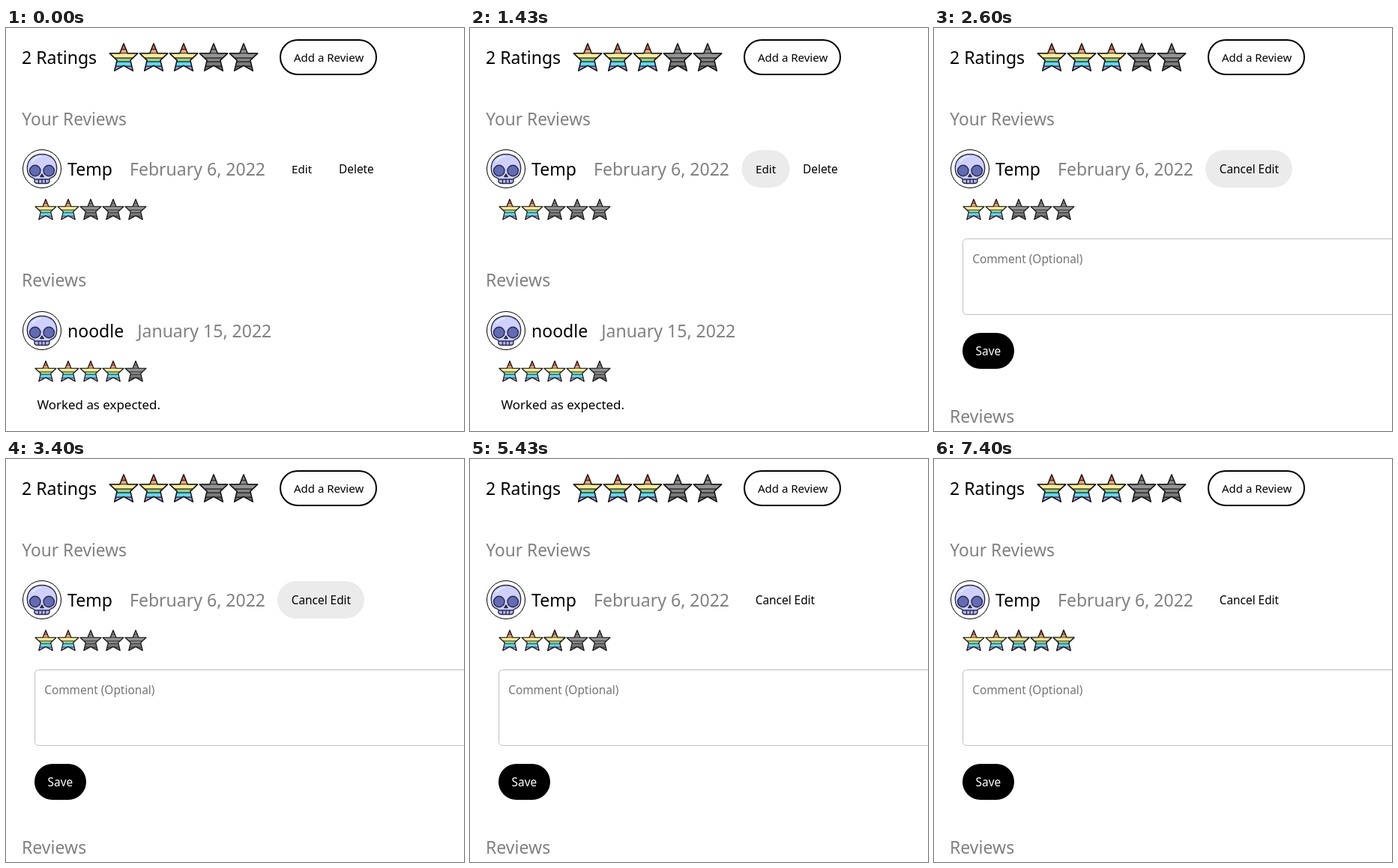
An HTML page that plays this animation: 611x538 px, repeating every 8000 ms.

```html
<!DOCTYPE html>
<html lang="en">
<head>
<meta charset="utf-8">
<title>Reviews</title>
<style>
html, body { margin: 0; width: 100%; height: 100%; overflow: hidden; background: #fff; }
svg { display: block; }
text { font-family: "Noto Sans", sans-serif; font-size: 15.4px; }
.big { font-size: 23.04px; }
.mute { fill: #808080; }

.lit { --a: #e8745c; --b: #f3a87c; --c: #fbeb9c; --d: #9bd08b; --e: #63d8f6; --f: #b39ae0; }
.dim { --a: #8c8c8c; --b: #8e8e8e; --c: #949494; --d: #868686; --e: #7a7a7a; --f: #6c6c6c; }

.view, .toggle { animation: 8s step-end infinite; }
.pill { fill: #ebebeb; animation: 8s cubic-bezier(.4, 0, .2, 1) infinite; }
#list { animation: shift 8s step-end infinite; }
#show { animation-name: show; }
#edit { animation-name: edit; }
#editPill { animation-name: editHover; }
#cancelPill { animation-name: cancelHover; }
.third { animation-name: third; }
.fourth { animation-name: fourth; }
.fifth { animation-name: fifth; }

@keyframes shift { 0% { transform: none } 30%, 100% { transform: translateY(182px) } }
@keyframes show { 0% { opacity: 1 } 30%, 100% { opacity: 0 } }
@keyframes edit { 0% { opacity: 0 } 30%, 100% { opacity: 1 } }
@keyframes editHover { 0%, 15% { opacity: 0 } 17.875%, 100% { opacity: 1 } }
@keyframes cancelHover { 0%, 29.75% { opacity: 0 } 32.5%, 42.25% { opacity: 1 } 45%, 100% { opacity: 0 } }
@keyframes third { 0% { opacity: 0 } 67.875%, 100% { opacity: 1 } }
@keyframes fourth { 0%, 87.125% { opacity: 0 } 72.875%, 91.625%, 100% { opacity: 1 } }
@keyframes fifth { 0%, 85% { opacity: 0 } 76.625%, 92.5%, 100% { opacity: 1 } }
</style>
</head>
<body>
<svg width="611" height="538" viewBox="0 0 611 538">
  <defs>
    <path id="starShape" d="M20 1.3 L25.2 14.3 H38.7 L28.9 23.6 L32.3 37.6 L20 30.8 L7.7 37.6 L11.1 23.6 L1.3 14.3 H14.8Z"/>
    <clipPath id="starClip"><use href="#starShape"/></clipPath>
    <symbol id="star" viewBox="0 0 40 40">
      <g clip-path="url(#starClip)">
        <rect width="40" height="9" fill="var(--a)"/>
        <rect y="9" width="40" height="5" fill="var(--b)"/>
        <rect y="14" width="40" height="6.5" fill="var(--c)"/>
        <rect y="20.5" width="40" height="5" fill="var(--d)"/>
        <rect y="25.5" width="40" height="6" fill="var(--e)"/>
        <rect y="31.5" width="40" height="8" fill="var(--f)"/>
        <path d="M0 9H40M0 14.2H40M0 20.5H40M0 25.5H40M0 31.5H40" stroke="#151515" stroke-width="1.3" opacity=".8"/>
      </g>
      <use href="#starShape" fill="none" stroke="#151515" stroke-width="1.6" stroke-linejoin="round"/>
    </symbol>
    <g id="skull" stroke="#292a4c" stroke-width="1.4" stroke-linejoin="round">
      <circle r="25.5" fill="#fff" stroke="#000" stroke-width="1"/>
      <path d="M-10 10V17Q-9 19.5-6 19.5H6Q9 19.5 10 17V10Z" fill="#b5b7f0"/>
      <path d="M0-19.5C12-19.5 19.7-11.5 19.7-1C19.7 6 18 10.5 12 12L9 14H-9L-12 12C-18 10.5-19.7 6-19.7-1C-19.7-11.5-12-19.5 0-19.5Z" fill="#cfd0fb"/>
      <path d="M-13-10Q-8-16-1-16.5" fill="none" stroke="#e6e6ff" stroke-width="2"/>
      <circle cx="-9.2" cy="2.5" r="7.2" fill="#626bb3"/>
      <circle cx="9.2" cy="2.5" r="7.2" fill="#626bb3"/>
      <path d="M0 7L2.2 10.5H-2.2Z" fill="#292a4c"/>
      <path d="M-4.5 14V19M0 14V19M4.5 14V19" fill="none"/>
    </g>
  </defs>

  <text class="big" x="21" y="48">2 Ratings</text>
  <rect x="366" y="16" width="128" height="46" rx="23" fill="#fff" stroke="#000" stroke-width="2"/>
  <text x="384" y="45" style="font-size:15px">Add a Review</text>

  <text class="big mute" x="21.3" y="130" style="font-size:22.7px">Your Reviews</text>
  <use href="#skull" x="48" y="188"/>
  <text class="big" x="82" y="197">Temp</text>
  <text class="big mute" x="165" y="197">February 6, 2022</text>

  <g id="show" class="view">
    <rect id="editPill" class="pill" x="362.5" y="163" width="64" height="50" rx="25"/>
    <text x="381" y="194" style="font-size:15.2px">Edit</text>
    <text x="444" y="194" style="font-size:15.4px">Delete</text>
  </g>
  <g id="edit" class="view">
    <rect id="cancelPill" class="pill" x="362" y="163" width="116" height="50" rx="25"/>
    <text x="380.7" y="194">Cancel Edit</text>
    <rect x="38.5" y="281.5" width="600" height="101" rx="5" fill="#fff" stroke="#c0c0c0"/>
    <text x="51.2" y="314" fill="#757575">Comment (Optional)</text>
    <rect x="38" y="407" width="69" height="48" rx="24"/>
    <text x="55.6" y="437" fill="#fff" font-weight="500">Save</text>
  </g>

  <g id="list">
    <text class="big mute" x="21" y="345">Reviews</text>
    <use href="#skull" x="48" y="404"/>
    <text class="big" x="82" y="413">noodle</text>
    <text class="big mute" x="175.2" y="413">January 15, 2022</text>
    <text x="41.5" y="509" style="font-size:16.9px">Worked as expected.</text>
  </g>
</svg>
<script>
const svg = document.querySelector('svg');

function star(parent, x, y, size, cls) {
  const use = document.createElementNS(svg.namespaceURI, 'use');
  const attrs = { href: '#star', x, y, width: size, height: size, class: cls };
  for (const [key, value] of Object.entries(attrs)) use.setAttribute(key, value);
  parent.append(use);
}

function rating(parent, x, y, size, score, toggles = []) {
  for (let i = 0; i < 5; i++) {
    const left = x + i * size;
    star(parent, left, y, size, i < score ? 'lit' : 'dim');
    if (toggles[i]) star(parent, left, y, size, `lit toggle ${toggles[i]}`);
  }
}

rating(svg, 137, 19.5, 40, 3);
rating(svg, 38, 227.5, 30, 2, [, , 'third', 'fourth', 'fifth']);
rating(document.getElementById('list'), 38, 443.5, 30, 4);
</script>
</body>
</html>
```
